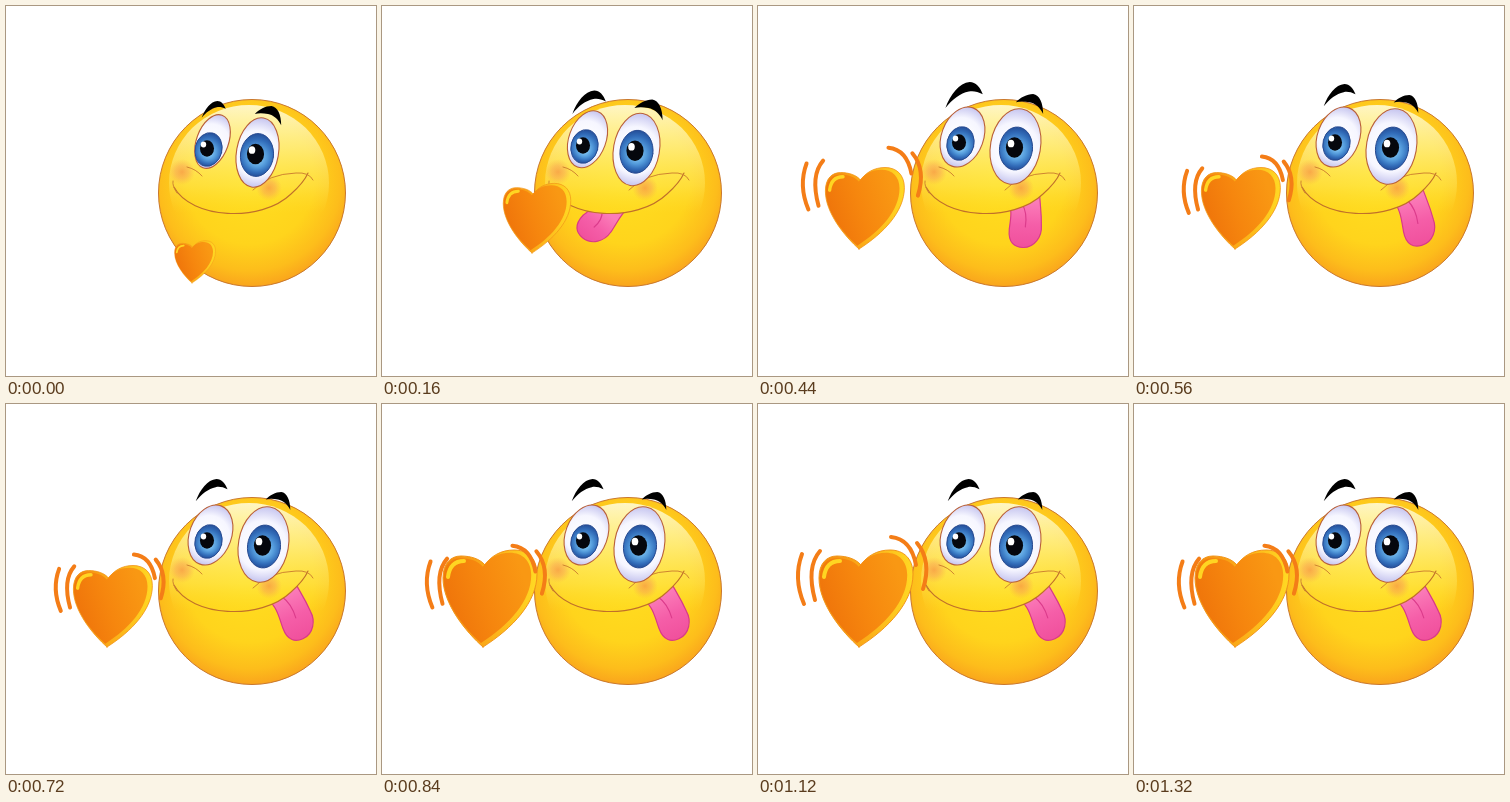
An HTML page with a canvas that plays this animation: 370x370 px, repeating every 1360 ms.

```html
<!DOCTYPE html>
<html lang="en">
<head>
<meta charset="utf-8">
<title>Smiley with a beating heart</title>
<style>
html, body { margin: 0; width: 100%; height: 100%; overflow: hidden; background: #fff; }
canvas { display: block; }
</style>
</head>
<body>
<canvas id="stage" width="370" height="370"></canvas>
<script>
const ctx = document.getElementById('stage').getContext('2d');
const LOOP = 1360, STEP = 40, GROW = 320;

const mouth = 'M168 181C185 213 255 217 285 188C294 180 299 174 302 167';
const belowMouth = new Path2D(mouth + 'L340 168V300H150V181Z');
const heart = new Path2D('M0 0C-17 -15 -40 -43 -40 -69C-40 -84 -32 -91 -22 -91C-12 -91 -3 -88 2 -82C8 -91 18 -97 31 -97C45 -97 54 -88 54 -73C54 -45 30 -19 0 0Z');
const leftBrow = new Path2D('M-22 30C-16 14 -6 1 6 0C13 0 18 6 21 14C15 11 10 10 5 11C-5 13 -14 20 -22 30Z');
const rightBrow = new Path2D('M-15 9C-10 4 -3 0 4 0C11 1 15 10 15 22C12 15 6 10 0 9C-6 8 -11 8 -15 9Z');
const beatMarks = new Path2D('M-57 -93Q-66 -69 -55 -43M-39 -96Q-53 -80 -44 -47M32 -110Q52 -108 57 -82M58 -104Q73 -86 64 -58');

// Keys start with a time; the rest is the pose.
const leftBrowKeys = [[0, 208, 95, .56], [320, 207, 74, 1], [560, 206, 78, .74], [720, 206, 75, .74]];
const rightBrowKeys = [[0, 262, 100, .88], [320, 271, 87, 1], [560, 272, 89, .82], [720, 272, 88, .82]];
// Root x, root y, angle in degrees, length
const tongueKeys = [[0, 200, 204, 55, -14], [160, 223, 205, 40, 35], [320, 257, 199, 18, 43], [560, 275, 192, -15, 49], [720, 277, 190, -24, 49]];

const mix = (a, b, k) => a + (b - a) * k;
const bend = (a, b, c, k) => mix(mix(a, b, k), mix(b, c, k), k);

function pose(keys, t) {
  const next = keys.findIndex(key => key[0] > t);
  if (next < 0) return keys[keys.length - 1].slice(1);
  const a = keys[next - 1], b = keys[next];
  const k = (t - a[0]) / (b[0] - a[0]);
  return a.slice(1).map((v, i) => mix(v, b[i + 1], k));
}

function shade(gradient, ...stops) {
  stops.forEach(([at, color]) => gradient.addColorStop(at, color));
  return gradient;
}

function place(x, y, angle, scale, draw) {
  ctx.save();
  ctx.translate(x, y);
  ctx.rotate(angle * Math.PI / 180);
  ctx.scale(scale, scale);
  draw();
  ctx.restore();
}

function fill(path, style) {
  ctx.fillStyle = style;
  ctx.fill(path);
}

function stroke(path, color, width = 1) {
  ctx.strokeStyle = color;
  ctx.lineWidth = width;
  ctx.stroke(path);
}

function oval(x, y, rx, ry, angle = 0) {
  const path = new Path2D();
  path.ellipse(x, y, rx, ry, angle * Math.PI / 180, 0, Math.PI * 2);
  return path;
}

function blush(x, y, r) {
  fill(oval(x, y, r, r), shade(ctx.createRadialGradient(x, y, 0, x, y, r),
    [0, 'rgba(246,140,70,.65)'], [.5, 'rgba(248,155,85,.45)'], [1, 'rgba(250,170,70,0)']));
}

function face() {
  const ball = oval(246, 187, 93.5, 93.5);
  fill(ball, shade(ctx.createRadialGradient(244, 174, 10, 244, 174, 118),
    [0, '#ffdd20'], [.5, '#ffd41c'], [.75, '#fdbd1b'], [1, '#f7931d']));
  fill(oval(243, 177, 80, 78), shade(ctx.createLinearGradient(0, 99, 0, 207),
    [0, 'rgba(255,253,225,.85)'], [.4, 'rgba(255,248,170,.6)'], [.75, 'rgba(255,240,110,.35)'], [1, 'rgba(255,230,60,0)']));
  stroke(ball, '#c9772c');
  blush(176, 166, 13);
  blush(263, 182, 13);
}

function tongue(t) {
  const [x, y, angle, len] = pose(tongueKeys, t);
  if (len <= 0) return;
  ctx.save();
  ctx.clip(belowMouth);
  place(x, y, angle, 1, () => {
    const body = new Path2D(`M-16 -14V0C-11 8 -13 ${len * .4} -14 ${len - 18}C-15 ${len - 4} -8 ${len} 0 ${len}C12 ${len} 19 ${len - 12} 18 ${len - 22}C18 ${len * .2} 16 5 15 -14Z`);
    fill(body, shade(ctx.createLinearGradient(0, 0, 0, len),
      [0, '#fb7cb9'], [.5, '#f55ea8'], [1, '#f0509c']));
    stroke(body, '#d83b87', 1.2);
    stroke(new Path2D(`M-2 2Q4 ${len * .25} 2 ${len * .55}`), '#dc3c8c', 1.2);
  });
  ctx.restore();
}

function eye(x, y, rx, ry, tilt, ix, iy, irisX, irisY) {
  const white = oval(x, y, rx, ry, tilt);
  fill(white, shade(ctx.createRadialGradient(x - 3, y + 2, 4, x, y, ry),
    [0, '#fff'], [.6, '#f6f6ff'], [1, '#c6c5ef']));
  stroke(white, '#b9603a', 1.1);
  ctx.save();
  ctx.clip(white);
  const iris = oval(ix, iy, irisX, irisY, tilt * .7);
  fill(iris, shade(ctx.createRadialGradient(ix, iy + 4, 2, ix, iy, irisY),
    [0, '#84c8f4'], [.42, '#5299da'], [.75, '#316bb8'], [1, '#244e98']));
  stroke(iris, '#274a91');
  fill(oval(ix - 1.5, iy - 1, irisX * .52, irisY * .48), '#05070d');
  fill(oval(ix - 5, iy - 5, irisX * .2, irisY * .18), '#fff');
  ctx.restore();
}

function eyes(k) {
  eye(mix(206.5, 204.5, k), mix(135.5, 131, k), mix(16, 21, k), mix(28, 31, k), 20,
    mix(202.5, 202.5, k), mix(143.5, 137.5, k), 13.5, 17);
  eye(mix(251.5, 257.5, k), mix(146.5, 140.5, k), mix(21, 25, k), mix(35, 38, k), 10,
    mix(251, 258, k), mix(149, 142.5, k), 16.5, 21.5);
}

function brow(path, keys, t) {
  const [x, y, scale] = pose(keys, t);
  place(x, y, 0, scale, () => fill(path, '#000'));
}

function drawHeart(t) {
  const k = Math.min(t / GROW, 1);
  const beating = k === 1;
  const beat = t % 160;
  const size = beating ? (beat < 80 ? 1 : .84) : mix(.436, 1, k);
  const x = bend(186, 156.5, 101, k), y = bend(277, 234, 243, k);
  place(x, y, 0, size, () => {
    fill(heart, shade(ctx.createLinearGradient(-40, 0, 54, 0),
      [0, '#f4890f'], [.5, '#fbae18'], [1, '#ffd923']));
    stroke(heart, '#f2951a');
    place(-2, -4, 0, .93, () => fill(heart,
      shade(ctx.createLinearGradient(-40, -30, 50, -60), [0, '#ee720a'], [.5, '#f6860e'], [1, '#f99813'])));
    stroke(new Path2D('M-35 -70Q-33 -86 -19 -86'), '#ffd522', 4);
  });
  if (beating) {
    const reach = 1 - .08 * (2 - Math.abs(beat - 80) / 40);
    place(x, y, 0, reach, () => stroke(beatMarks, '#f47d17', 4 / reach));
  }
}

function render(t) {
  ctx.fillStyle = '#fff';
  ctx.fillRect(0, 0, 370, 370);
  face();
  tongue(t);
  stroke(new Path2D(mouth), '#c0702a', 1.1);
  stroke(new Path2D('M247 184Q262 168 290 167Q303 166 307 174M167 175Q166 180 171 187M181 161Q190 163 196 170'), '#cf8430', 1);
  eyes(Math.min(t / GROW, 1));
  brow(leftBrow, leftBrowKeys, t);
  brow(rightBrow, rightBrowKeys, t);
  drawHeart(t);
}

function tick() {
  render(Math.floor(performance.now() % LOOP / STEP) * STEP);
  requestAnimationFrame(tick);
}

ctx.lineCap = 'round';
tick();
</script>
</body>
</html>
```
